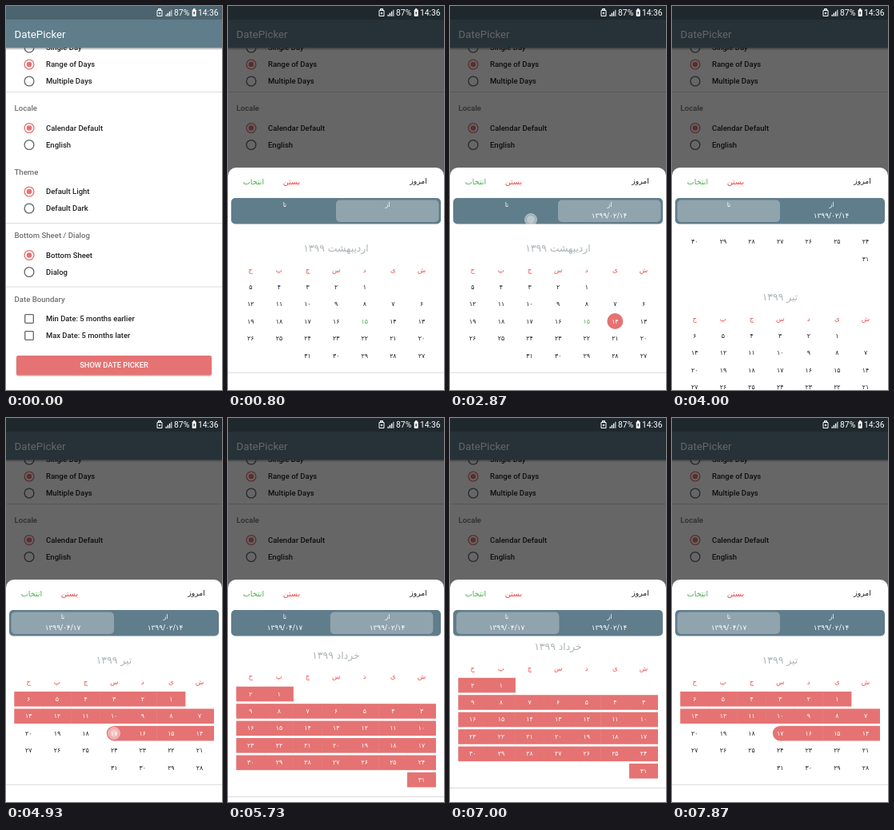
Animation of 270 by 480 pixels, one loop 8000 ms. Source, as an HTML page:

```html
<!DOCTYPE html>
<html lang="en">
<head>
<meta charset="utf-8">
<title>Date picker</title>
<style>
html, body { margin: 0; width: 100%; height: 100%; overflow: hidden; background: #fff; }
svg { display: block; width: 100vw; height: 100vh; }
text { font-family: Roboto, "Noto Sans", sans-serif; }
.fa { font-family: "DejaVu Sans", sans-serif; direction: rtl; text-anchor: middle; }
</style>
</head>
<body>
<svg id="stage" viewBox="0 0 270 480">
  <defs>
    <clipPath id="listClip"><rect y="276" width="270" height="204"/></clipPath>
    <clipPath id="buttonClip"><rect x="13" y="437" width="244" height="24.5" rx="2"/></clipPath>
    <linearGradient id="shade" x2="0" y2="1">
      <stop stop-color="#000" stop-opacity=".28"/>
      <stop offset="1" stop-color="#000" stop-opacity="0"/>
    </linearGradient>
  </defs>
</svg>
<script>
(() => {
const LOOP = 8000;
const RED = '#e57373', SLATE = '#607d8b', GREEN = '#4caf50', INK = '#222';
const stage = document.getElementById('stage');

function add(parent, tag, attrs, content) {
  const el = document.createElementNS('http://www.w3.org/2000/svg', tag);
  for (const k in attrs) el.setAttribute(k, attrs[k]);
  if (content !== undefined) el.textContent = content;
  parent.appendChild(el);
  return el;
}
const group = (parent, attrs) => add(parent, 'g', attrs);
const rect = (parent, x, y, width, height, fill, rx = 0) =>
  add(parent, 'rect', { x, y, width, height, fill, rx });
const circle = (parent, cx, cy, r, fill, more) =>
  add(parent, 'circle', { cx, cy, r, fill, ...more });
const latin = (parent, str, x, y, size, fill, more) =>
  add(parent, 'text', { x, y: y + size * 0.355, 'font-size': size, fill, ...more }, str);
const persian = (parent, str, x, y, size, fill, more) =>
  add(parent, 'text', { class: 'fa', x, y: y + size * 0.32, 'font-size': size, fill, ...more }, str);
const digits = n => String(n).replace(/\d/g, d => String.fromCharCode(0x6f0 + +d));

// ---- settings page ----
rect(stage, 0, 0, 270, 480, '#fff');
for (const y of [107.5, 271.5, 351]) rect(stage, 0, y - 0.5, 270, 1, '#dcdcdc');

for (const [str, y] of [['Locale', 128], ['Theme', 207.5], ['Bottom Sheet / Dialog', 287], ['Date Boundary', 366.5]])
  latin(stage, str, 10.5, y, 9.6, '#707070', { 'font-weight': 500 });

function option(str, y, on) {
  const color = on ? RED : '#666';
  circle(stage, 29, y, 5.9, 'none', { stroke: color, 'stroke-width': 1.3 });
  if (on) circle(stage, 29, y, 3.3, color);
  latin(stage, str, 50, y, 9.5, INK, { 'font-weight': 500 });
}
option('Single Day', 52, false);
option('Range of Days', 73, true);
option('Multiple Days', 94, false);
option('Calendar Default', 152.5, true);
option('English', 173.5, false);
option('Default Light', 232, true);
option('Default Dark', 253, false);
option('Bottom Sheet', 311.5, true);
option('Dialog', 332.5, false);

for (const [str, y] of [['Min Date: 5 months earlier', 391], ['Max Date: 5 months later', 412]]) {
  add(stage, 'rect', { x: 23.7, y: y - 5.3, width: 10.6, height: 10.6, rx: 1, fill: 'none', stroke: '#666', 'stroke-width': 1.3 });
  latin(stage, str, 50, y, 9.4, INK, { 'font-weight': 500 });
}

rect(stage, 12.5, 438, 245, 25, 'rgba(0,0,0,.18)', 3);
rect(stage, 13, 437, 244, 24.5, RED, 2);
const ripple = circle(group(stage, { 'clip-path': 'url(#buttonClip)' }), 140, 449, 1, '#fff');
latin(stage, 'SHOW DATE PICKER', 135, 449, 9.3, '#fff', { 'text-anchor': 'middle', 'font-weight': 500 });

rect(stage, 0, 52.5, 270, 3, 'url(#shade)');
rect(stage, 0, 17, 270, 35.5, SLATE);
latin(stage, 'DatePicker', 10.5, 35, 13.3, '#fff');
rect(stage, 0, 0, 270, 17, '#4c6470');

const dim = rect(stage, 0, 0, 270, 480, '#000');

// ---- status icons stay bright ----
add(stage, 'path', { d: 'M189 5.5h6v7h-6zM190.5 3.5h3v1.5h-3zM190.7 9h2.6M192 7.7v2.6', fill: 'none', stroke: '#fff', 'stroke-width': 1 });
for (let i = 0; i < 4; i++) rect(stage, 199.5 + i * 2.2, 10.8 - i * 2, 1.4, 2 + i * 2, i < 3 ? '#fff' : '#b5bec3');
latin(stage, '87%', 210, 8.6, 10.4, '#fff');
rect(stage, 232.7, 4.4, 5, 8.6, '#fff', 1);
rect(stage, 234, 3.2, 2.4, 2, '#fff');
rect(stage, 234.4, 7, 1.6, 3.4, '#555');
latin(stage, '14:36', 240, 8.6, 10.3, '#fff');

// ---- bottom sheet ----
const sheet = group(stage, {});
add(sheet, 'path', { d: 'M0 480V212a10 10 0 0 1 10-10H260a10 10 0 0 1 10 10V480z', fill: '#fff' });
persian(sheet, 'امروز', 238, 219.5, 9.3, INK);
persian(sheet, 'بستن', 79.5, 219.5, 9.6, '#f04444');
persian(sheet, 'انتخاب', 32, 219.5, 9.6, GREEN);

rect(sheet, 4, 240, 262, 32.5, SLATE, 5);
const thumb = rect(sheet, 0, 242.5, 128.5, 27.5, '#90a4ae', 5);
persian(sheet, 'از', 199.5, 248.5, 8, '#fff');
persian(sheet, 'تا', 71, 248.5, 8, '#fff');
const fromDate = persian(sheet, digits('1399/02/14'), 199, 262, 9, '#fff');
const toDate = persian(sheet, digits('1399/04/17'), 71, 262, 9, '#fff');

// ---- months ----
const COL = 35.62, ROW = 21.45, BAR = 18.6;
const list = group(group(sheet, { 'clip-path': 'url(#listClip)' }), {});
const bars = group(list, {});
const startDot = circle(list, 242 - COL, 394, 10, RED);
const days = [], tops = [], lines = [];
const months = [['اردیبهشت', 2], ['خرداد', 5], ['تیر', 1], ['مرداد', 4]];
let titleY = 303;

months.forEach(([name, first], m) => {
  tops.push(titleY);
  persian(list, `${name} ${digits(1399)}`, 135, titleY, 12.4, '#adb4b8');
  [...'شیدسچپج'].forEach((c, i) => persian(list, c, 242 - COL * i, titleY + 27, 8.6, '#ef5350'));
  for (let d = 1; d <= 31; d++) {
    const slot = first + d - 1;
    const x = 242 - COL * (slot % 7), y = titleY + 48.3 + ROW * Math.floor(slot / 7);
    const isStart = m === 0 && d === 14, isEnd = m === 2 && d === 17;
    const inRange = (m === 0 && d >= 14) || m === 1 || (m === 2 && d <= 17);
    if (inRange) {
      if (isStart || isEnd) circle(bars, x, y, BAR / 2, RED);
      const left = isEnd ? x : x - COL / 2, right = isStart ? x : x + COL / 2;
      rect(bars, left - 0.2, y - BAR / 2, right - left + 0.4, BAR, RED);
    }
    const today = m === 0 && d === 15;
    days.push({ el: persian(list, digits(d), x, y, 7.9, INK), inRange, isStart, color: today ? GREEN : INK });
  }
  const rows = Math.ceil((first + 31) / 7);
  const lineY = titleY + 47.5 + rows * ROW;
  lines.push({ el: rect(list, 0, lineY, 270, 1, '#d9d9d9'), y: lineY });
  titleY += 74.8 + rows * ROW;
});
const TRAVEL = tops[2] - tops[0];

// ---- touch marker ----
const touch = group(stage, {});
circle(touch, 0, 0, 7.5, '#fff', { 'fill-opacity': 0.4, stroke: '#fff', 'stroke-opacity': 0.4 });
circle(touch, 0, 0, 5, '#fff', { 'fill-opacity': 0.3 });

// ---- timeline ----
const part = (t, a, b) => Math.min(1, Math.max(0, (t - a) / (b - a)));
const out = (t, a, b, p = 2.4) => 1 - Math.pow(1 - part(t, a, b), p);
const show = (el, on) => el.setAttribute('opacity', +on);

const DRAG = 3530;
const taps = [ // start, end, x, y
  [70, 300, 140, 449],
  [1400, 1720, 206, 394],
  [2670, 2960, 101, 267],
  [DRAG, 3760, 135, 430],
  [4670, 5000, 135, 394],
  [5470, 5680, 195, 262],
  [6670, 6880, 80, 256]
];

function draw(t) {
  const scroll = TRAVEL * (out(t, 3540, 4400) - out(t, 5560, 6270, 2.6) + out(t, 6830, 7470, 2.34));
  list.setAttribute('transform', `translate(0 ${-scroll})`);
  // the closing line only shows near the bottom edge
  for (const line of lines) show(line.el, line.y - scroll > 445);

  const rise = out(t, 650, 790);
  sheet.setAttribute('transform', `translate(0 ${280 * (1 - rise)})`);
  show(sheet, t >= 650);
  dim.setAttribute('opacity', 0.6 * rise);

  ripple.setAttribute('r', 8 + 140 * out(t, 70, 330));
  ripple.setAttribute('opacity', t < 70 ? 0 : 0.25 * (1 - part(t, 260, 470)));

  const side = out(t, 2930, 3170) - out(t, 5570, 5800) + out(t, 6790, 7040);
  thumb.setAttribute('x', 135 - 128.5 * side);

  const state = t < 1600 ? 0 : t < 4860 ? 1 : 2;
  show(fromDate, state > 0);
  show(toDate, state > 1);
  show(startDot, state === 1);
  show(bars, state === 2);
  for (const d of days) {
    const lit = state === 2 ? d.inRange : state === 1 && d.isStart;
    d.el.setAttribute('fill', lit ? '#fff' : d.color);
  }

  const tap = taps.find(([a, b]) => t >= a && t < b);
  if (tap) {
    const [a, b, x, y] = tap;
    touch.setAttribute('transform', `translate(${x} ${a === DRAG ? y - scroll : y})`);
    touch.setAttribute('opacity', part(t, a - 20, a + 60) * (1 - part(t, b - 60, b)));
  } else show(touch, false);
}

const begin = performance.now();
function tick() {
  draw(Math.max(0, performance.now() - begin) % LOOP);
  requestAnimationFrame(tick);
}
draw(0);
requestAnimationFrame(tick);
})();
</script>
</body>
</html>
```
